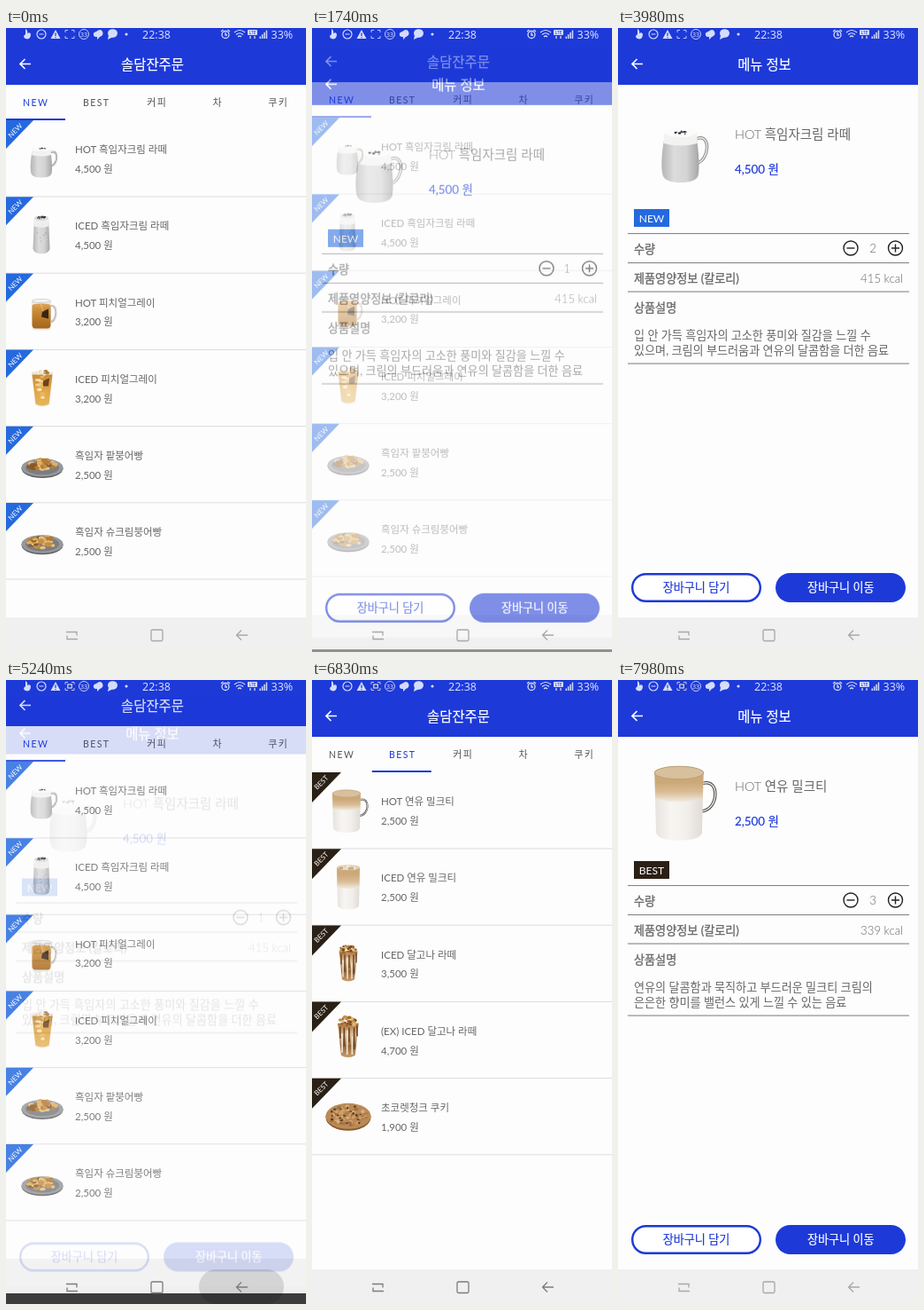
An HTML page that plays this animation: 339x703 px, repeating every 8000 ms.

```html
<!DOCTYPE html>
<html lang="ko">
<head>
<meta charset="utf-8">
<title>Cafe order</title>
<style>
html, body { margin: 0; width: 100%; height: 100%; overflow: hidden; background: #181818; }
svg { display: block; width: 339px; height: 703px; }
text { font-family: Lato, "Noto Sans CJK KR", "Noto Sans CJK JP", "Noto Sans CJK", sans-serif; fill: #666; white-space: pre; }
.mid { text-anchor: middle; }
.end { text-anchor: end; }
.thin { font-weight: 300; }
.white { fill: #fff; }
.blue { fill: #1d39d8; stroke: #1d39d8; stroke-width: .15px; }
.grey { stroke: #666; stroke-width: .3px; }
.head { fill: #fff; stroke: #fff; stroke-width: .2px; }
.tab { letter-spacing: 1.4px; fill: #555; }
.status text { font-family: "Noto Sans", sans-serif; fill: #d5dcfb; }
.status .dark { fill: #1d39d8; }
</style>
</head>
<body>
<svg id="stage" viewBox="0 0 339 703" xmlns="http://www.w3.org/2000/svg"></svg>
<script>
const LOOP = 8000, BLUE = '#1d39d8', ROW = 86.2, TAB = 67.8;
const text = (x, y, size, str, cls = '') => `<text x="${x}" y="${y}" font-size="${size}" class="${cls}">${str}</text>`;
const rect = (x, y, w, h, fill, more = '') => `<rect x="${x}" y="${y}" width="${w}" height="${h}" fill="${fill}" ${more}/>`;
const oval = (x, y, rx, ry, fill, more = '') => `<ellipse cx="${x}" cy="${y}" rx="${rx}" ry="${ry}" fill="${fill}" ${more}/>`;
const path = (d, fill, more = '') => `<path d="${d}" fill="${fill}" ${more}/>`;
const line = (d, color, w = 1, more = '') => path(d, 'none', `stroke="${color}" stroke-width="${w}" ${more}`);
const group = (id, body, more = '') => `<g id="${id}" ${more}>${body}</g>`;

let seed = 7;
const rand = () => (seed = seed * 16807 % 2147483647) / 2147483647;
// scatter small blobs inside an ellipse
function crumbs(n, cx, cy, rx, ry, colors, size) {
  let out = '';
  for (let i = 0; i < n; i++) {
    const a = rand() * 6.283, r = Math.sqrt(rand());
    out += oval((cx + rx * r * Math.cos(a)).toFixed(1), (cy + ry * r * Math.sin(a)).toFixed(1),
      (size * (.6 + rand() * .6)).toFixed(1), (size * (.4 + rand() * .5)).toFixed(1), colors[i % colors.length]);
  }
  return out;
}

// every drawing is placed relative to the top left of its list row
const glass = (top, half, base, bottom, fill) =>
  path(`M${41 - half} ${top}L${41 - base} ${bottom - 2}Q41 ${bottom + 2} ${41 + base} ${bottom - 2}L${41 + half} ${top}Z`, fill);
const handle = (d, edge) => line(d, edge, 2) + line(d, '#ececea', .8);
const art = {
  sesameHot: () =>
    handle('M50.500 36C60 32 59 50 50.500 52', '#8d8d8d') +
    path('M29.500 35C27.500 46 27 55 28.500 60Q30 64.500 40 64.500Q50 64.500 51.500 60C52.500 55 52 46 50.500 35Z', 'url(#steel)') +
    path('M29 39L29.500 32Q40 27 50.500 32L51 39Q40 42 29 39Z', '#f3f2f0') +
    oval(40, 32, 10.3, 3, '#fbfbfa') + crumbs(12, 40.5, 32, 4, 1, ['#26243a', '#504d62'], .8),
  sesameIced: () =>
    path('M32 24L30.500 58Q31 64 40 64Q49 64 49.500 58L48 24Z', 'url(#steel)') +
    path('M32 24L31.500 33Q40 36 48.500 33L48 24Z', '#efeeec') + oval(40, 24, 8, 3, '#dcdbd9') +
    crumbs(16, 40, 23.5, 5.5, 1.5, ['#2a2930', '#4b4950'], 1.1) +
    crumbs(12, 40, 46, 7, 8, ['#a0a0a3', '#dedede'], .8),
  peachHot: () =>
    handle('M50 37C59 34 58 54 50 55', '#a9a49c') +
    path('M29 31V60Q29 64 33 64H47Q51 64 51 60V31Z', '#eeeae4') +
    path('M29.500 36V58Q30 62 33 62H47Q50 62 50.500 58V36Z', 'url(#tea)') +
    oval(40, 36, 10.5, 2, '#d9a050') + oval(40, 31, 11, 2, '#f7f5f2', 'stroke="#bbb" stroke-width=".6"') +
    path('M41 43L48 40L48 51L40 49Z', '#3a2513') + line('M42 43L39 34', '#e8d6b5', .6),
  peachIced: () =>
    glass(25, 12, 8, 64, '#ece4d6') + glass(28, 11.5, 7.5, 63, 'url(#peach)') +
    crumbs(9, 40, 43, 6, 13, ['#f2cf8d', '#e9b75c', '#fae5b8'], 2.8) +
    path('M42 35L49 32L48 41L42 41Z', '#6b4320') + crumbs(9, 41, 26, 9, 2.5, ['#e9dcc4', '#a87a3c', '#f4ebda'], 2.2),
  plate: () =>
    oval(41, 47.5, 23.5, 10.8, '#5f6064') + oval(41, 46.5, 23.5, 10.3, '#96979b') + oval(41, 46.5, 19, 8, '#7c7d81') +
    crumbs(44, 41, 44.5, 16, 6.5, ['#c68f43', '#8a5a26', '#dcb068', '#b47b35', '#e6c182'], 3.3),
  milkHot: () =>
    handle('M54 31C66 27 65 48 54 49', '#4f4a45') +
    path('M23 24L24 63Q25 68 39 68Q53 68 54 63L55 24Z', 'url(#milk)') +
    path('M23 24L23.500 41Q39 45 54.500 41L55 24Z', 'url(#foam)') +
    oval(39, 24, 16, 4.2, '#d8c09c', 'stroke="#b99f7a" stroke-width=".6"'),
  milkIced: () =>
    path('M28 21L29 64Q30 68 41 68Q52 68 53 64L54 21Z', 'url(#milk)') +
    path('M28 21L28.500 43Q41 47 53.500 43L54 21Z', 'url(#foam)') + oval(41, 21, 13, 3, '#e2cfb0') +
    crumbs(8, 41, 21.5, 9, 1.6, ['#f1e6d4', '#c9a77c'], 2.2),
  dalgona: () =>
    glass(29, 10.5, 7, 63, 'url(#latte)') +
    line('M33 32V44M37 33V52M42 33V48M47 33V55M50 31V42', '#6b411f', 1.4) +
    line('M35 39V58M40 36V60M45 42V60', '#f4e6d2', 1.5) +
    crumbs(34, 41, 27, 8.5, 5, ['#a06a30', '#c4914f', '#dfb878', '#754618'], 1.9),
  cookie: () =>
    oval(41, 44, 25.5, 15, '#8b5c30') + oval(41, 42.5, 25.5, 14.5, '#ba8a56') +
    crumbs(60, 41, 42, 22, 11.5, ['#cfa26c', '#a3713f', '#d8b182', '#b27f4a'], 2.2) +
    crumbs(20, 41, 42, 21, 11, ['#55331b', '#6b4526'], 1.6)
};
art.dalgonaEx = () => `<g transform="translate(-5.5 -8.5) scale(1.13)">${art.dalgona()}</g>`;

const kinds = { NEW: ['#2569df', 31], BEST: ['#2b2016', 33] };
const menus = {
  NEW: [['HOT 흑임자크림 라떼', '4,500', 'sesameHot'], ['ICED 흑임자크림 라떼', '4,500', 'sesameIced'],
    ['HOT 피치얼그레이', '3,200', 'peachHot'], ['ICED 피치얼그레이', '3,200', 'peachIced'],
    ['흑임자 팥붕어빵', '2,500', 'plate'], ['흑임자 슈크림붕어빵', '2,500', 'plate']],
  BEST: [['HOT 연유 밀크티', '2,500', 'milkHot'], ['ICED 연유 밀크티', '2,500', 'milkIced'],
    ['ICED 달고나 라떼', '3,500', 'dalgona'], ['(EX) ICED 달고나 라떼', '4,700', 'dalgonaEx'],
    ['초코렛청크 쿠키', '1,900', 'cookie']]
};

function page(kind, x) {
  const [color, side] = kinds[kind];
  const rows = menus[kind].map(([name, price, pic], i) => `<g transform="translate(${x} ${(104 + i * ROW).toFixed(1)})">` +
    rect(0, 85.5, 339, 1, '#dcdcdc') + path(`M0 0H${side}L0 ${side + 1}Z`, color) +
    `<g transform="rotate(-45 10.5 11.5)">${text(10.5, 14.2, 8, kind, 'mid white')}</g>` +
    art[pic]() + text(78, 37.3, 11.5, name) + text(78, 59, 11.5, price + ' 원') + '</g>');
  return rows.join('');
}

const header = (title, top) => rect(0, top, 339, 64 - top, BLUE) +
  line('M28 40.500H16M21.500 35L16 40.500L21.500 46', '#fff', 1.7) + text(165.5, 46.5, 15.4, title, 'mid head');
const sheet = rect(0, 0, 339, 703, '#fdfdfd') + rect(0, 664, 339, 39, '#f0f0f0');

const listView = sheet + `<g clip-path="url(#pager)">${group('pages', page('NEW', 0) + page('BEST', 339))}</g>` +
  header('솔담잔주문', 0) +
  ['NEW', 'BEST', '커피', '차', '쿠키'].map((t, i) =>
    `<g id="tab${i}">${text((33.7 + i * 68.5).toFixed(1), 88.3, i < 2 ? 10.5 : 11, t, 'mid tab')}</g>`).join('') +
  group('bar', rect(0, 102, 67, 2, BLUE));

const ring = (x, sign) => `<circle cx="${x}" cy="248" r="8" fill="none" stroke="#222" stroke-width="1.4"/>` +
  line(`M${x - 4.5} 248h9${sign == '+' ? 'm-4.500 -4.500v9' : ''}`, '#222', 1.4);

const counter = (id, n) => group(`${id}q${n}`,
  ring(n > 1 ? 263 : 265, '-') + text(292, 253.2, 13.2, n, 'end thin'), n > 1 ? 'opacity="0"' : '');

function detail(id, kind, kcal, about, picY) {
  const [name, price, pic] = menus[kind][0];
  return group(id, sheet + header('메뉴 정보', 0) +
    `<g transform="translate(1.5 ${picY}) scale(1.73)">${art[pic]()}</g>` +
    text(132, 125, 14.5, name, 'thin') + text(132, 164, 13.4, price + ' 원', 'blue') +
    rect(18, 204, 40, 20, kinds[kind][0]) + text(38, 218.6, 12, kind, 'mid white') +
    [231.5, 264.5, 297, 378].map(y => rect(11, y - .5, 318, 1.1, '#858585')).join('') +
    text(18, 254, 13.1, '수량', 'grey') + text(18, 287, 13.1, '제품영양정보 (칼로리)', 'grey') +
    text(18, 319.7, 13.1, '상품설명', 'grey') + text(322, 287, 13.2, kcal + ' kcal', 'end thin') +
    [1, 2, 3].map(n => counter(id, n)).join('') + ring(313.5, '+') +
    about.map((s, i) => text(18, 351.2 + i * 17, 13.1, s)).join('') +
    rect(16.2, 615.2, 144.6, 30.6, '#fff', `rx="15.3" stroke="${BLUE}" stroke-width="2.4"`) +
    rect(178, 614, 147, 33, BLUE, 'rx="16.5"') +
    text(88.5, 635.3, 13.1, '장바구니 담기', 'mid blue') + text(251.8, 635.3, 13.1, '장바구니 이동', 'mid head'),
    'opacity="0"');
}

const PALE = '#d5dcfb';
const status = `<g class="status">` + rect(0, 0, 339, 14, BLUE) +
  path('M22 1Q25 3 24 6Q27 4 28 7Q28 12 24 12.500Q20 12 20 9L22 7Z', PALE) +
  line('M45 7A5 5 0 1 1 35 7A5 5 0 1 1 45 7M37.500 7H42.500', PALE, 1.2) +
  path('M56 2L61.500 12H50.500Z', PALE) + line('M56 5.500V9M56 10V11', BLUE, 1.2) +
  line('M67 5V2.500H70M74 2.500H77V5M77 9V11.500H74M70 11.500H67V9', '#b9c4f5') +
  group('rec', rect(69.8, 5, 4.5, 4, 'none', 'stroke="#e6d9b8" stroke-width="1.2"')) +
  oval(88, 7, 5.5, 5.5, 'none', `stroke="${PALE}" stroke-width=".9"`) + text(88, 9.6, 7, '33', 'mid') +
  path('M99 8Q98 5 102 4Q107 0 109 4Q111 8 106 10L103 13L103 10Q99 10 99 8Z', PALE) +
  oval(120.5, 6, 5.5, 4.8, PALE) + path('M116 8L115 13L121 10Z', PALE) + oval(136, 7, 1.6, 1.6, PALE) +
  text(154, 11.6, 12.5, '22:38') +
  oval(248, 7.5, 4, 4, 'none', `stroke="${PALE}" stroke-width="1.3"`) +
  line('M248 5V8H250M243 4L245.500 2M253 4L250.500 2', PALE, 1.3) +
  line('M258 5Q264 0 270 5M260 7.500Q264 4 268 7.500M262 10Q264 8 266 10', PALE, 1.2) +
  rect(273, 2, 11, 6, PALE, 'rx="1"') + text(278.5, 7.2, 5, 'LTE', 'mid dark') +
  line('M276 9V12M281 9V12', PALE, 1.3) +
  [0, 1, 2, 3].map(i => rect(286.5 + i * 2.4, 9.5 - i * 2.3, 1.5, 2.5 + i * 2.3, PALE)).join('') +
  text(299.5, 11.6, 12.5, '33%') + '</g>';

const nav = rect(218, 664, 96, 39, '#000', 'id="press" rx="19.5" opacity="0"') +
  group('keys', '<path d="M68 680.500H80V684.500M81 688.500H69V684.500"/>' +
    '<rect x="164" y="678" width="13" height="12.5" rx="1.5"/><path d="M273 684H260.500M266 678.500L260.500 684L266 689.500"/>',
    'fill="none" stroke="#a8a8a8" stroke-width="1.3"');

const fade = (id, stops, vertical) => `<linearGradient id="${id}" ${vertical ? 'x2="0" y2="1"' : ''}>` +
  stops.map((c, i) => `<stop offset="${i / (stops.length - 1)}" stop-color="${c}"/>`).join('') + '</linearGradient>';
const defs = '<defs><clipPath id="pager"><rect y="104" width="339" height="560"/></clipPath>' +
  fade('steel', ['#b4b4b5', '#dcdcdc', '#d4d4d4', '#a6a6a7']) + fade('tea', ['#d89a44', '#bd7d2c', '#a4651f'], 1) +
  fade('peach', ['#c98c38', '#e0a647', '#e8b45c'], 1) + fade('milk', ['#e6e3de', '#f7f5f2', '#f2efeb', '#dedad4']) +
  fade('foam', ['#c9aa80', '#cda877', '#d9bd97', '#f2ece3'], 1) +
  fade('latte', ['#a8713a', '#dcbf99', '#94653a', '#c99f6c'], 1) + '</defs>';

document.getElementById('stage').innerHTML = defs + group('list', listView) +
  detail('hot', 'NEW', 415, ['입 안 가득 흑임자의 고소한 풍미와 질감을 느낄 수', '있으며, 크림의 부드러움과 연유의 달콤함을 더한 음료'], 62.5) +
  detail('milkTea', 'BEST', 339, ['연유의 달콤함과 묵직하고 부드러운 밀크티 크림의', '은은한 향미를 밸런스 있게 느낄 수 있는 음료'], 63) +
  status + nav;

// steps: [ms, value, easing to the next step]; values hold when no easing is given
function play(target, prop, steps) {
  const el = typeof target == 'string' ? document.getElementById(target) : target;
  const keys = steps.map(([t, v, easing = 'step-end']) => ({ offset: t / LOOP, [prop]: v, easing }));
  if (steps[0][0] > 0) keys.unshift({ ...keys[0], offset: 0, easing: 'step-end' });
  keys.push({ offset: 1, [prop]: steps[steps.length - 1][1] });
  el.animate(keys, { duration: LOOP, iterations: Infinity });
}
const toX = v => `translate(${v}px, 0px)`, toY = v => `translate(0px, ${v}px)`;
const SLOW_IN = 'cubic-bezier(.4,0,.2,1)', QUINT = 'cubic-bezier(.22,1,.36,1)';
const OPEN1 = 1640, CLOSE = 5120, BACK = 5154, OPEN2 = 6930, MOVE = 425, SWIPE = [5910, 6380];

play('list', 'transform', [[OPEN1, toY(0), SLOW_IN], [OPEN1 + MOVE, toY(-14)],
  [BACK, toY(-14), SLOW_IN], [BACK + MOVE, toY(0)], [OPEN2, toY(0), SLOW_IN], [OPEN2 + MOVE, toY(-14)]]);
play('hot', 'transform', [[OPEN1, toY(28.8), SLOW_IN], [OPEN1 + MOVE, toY(0)],
  [CLOSE, toY(0), 'ease-in'], [CLOSE + 145, toY(26.3)]]);
play('hot', 'opacity', [[OPEN1, 0, 'linear'], [OPEN1 + 180, 1], [CLOSE, 1, 'linear'], [CLOSE + 145, 0]]);
play('milkTea', 'transform', [[OPEN2, toY(28.8), SLOW_IN], [OPEN2 + MOVE, toY(0)]]);
play('milkTea', 'opacity', [[OPEN2, 0, 'linear'], [OPEN2 + 180, 1]]);

play('pages', 'transform', [[SWIPE[0], toX(0), QUINT], [SWIPE[1], toX(-339)]]);
play('bar', 'transform', [[SWIPE[0], toX(0), QUINT], [SWIPE[1], toX(TAB)]]);
[['tab0', BLUE, '#555', 5970], ['tab1', '#555', BLUE, 6060]].forEach(([id, from, to, at]) =>
  play(document.querySelector(`#${id} text`), 'fill', [[0, from], [at, to]]));

function count(id, changes) {
  for (const n of [1, 2, 3]) play(`${id}q${n}`, 'opacity', changes.map(([t, v]) => [t, +(v == n)]));
}
count('hot', [[0, 1], [2810, 2], [3170, 3], [3930, 2], [4250, 1]]);
count('milkTea', [[0, 1], [7640, 2], [7860, 3]]);

play('rec', 'opacity', [[0, 0], [290, 1], [1210, 0], [2810, 1], [3780, 0], [4810, 1]]);
play('press', 'opacity', [[5080, 0, 'linear'], [5150, .12], [5260, .12, 'linear'], [5560, 0]]);
play('keys', 'stroke', [[0, '#a8a8a8'], [5080, '#7c7c7c'], [6900, '#7c7c7c', 'linear'], [7400, '#a8a8a8']]);
</script>
</body>
</html>
```
